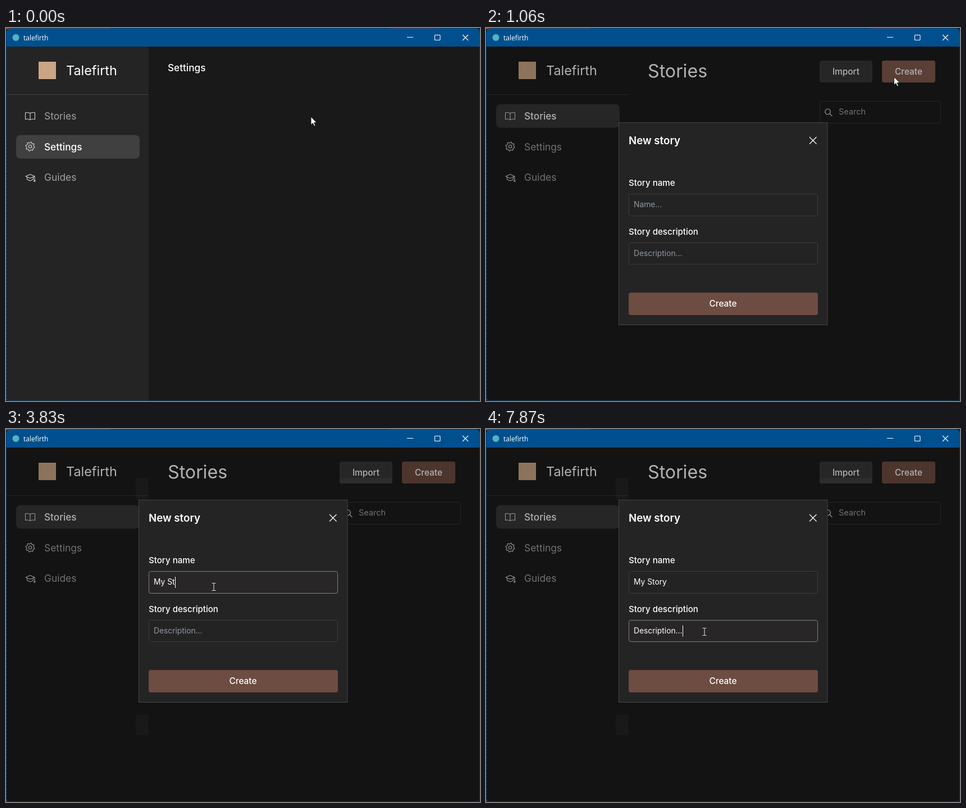
An HTML page that plays this animation: 844x664 px, repeating every 8000 ms.

```html
<!DOCTYPE html>
<html lang="en">
<head>
<meta charset="utf-8">
<title>talefirth</title>
<style>
html, body { margin: 0; width: 100%; height: 100%; overflow: hidden; background: #14202c; }
svg { display: block; width: 844px; height: 664px; }
text { font-family: Inter, "Noto Sans", sans-serif; fill: #fff; white-space: pre; }
.caption { font: 12px "Open Sans", "Noto Sans", sans-serif; }
.brand { font-size: 23.4px; }
.h1 { font-size: 32.2px; }
.h2 { font-size: 17.2px; font-weight: 500; }
.nav { font-size: 17.4px; fill: #a2a2a2; }
.nav.on { font-size: 17.2px; font-weight: 500; fill: #fff; }
.btn { font-size: 15.4px; font-weight: 500; text-anchor: middle; }
.hint { font-size: 14.5px; fill: #a3a3a3; }
.title { font-size: 18.7px; font-weight: 600; }
.label { font-size: 15.1px; font-weight: 500; }
.value { font-size: 13.8px; }
.value.empty { fill: #9098a3; }
.line { fill: none; stroke: #d4d4d4; stroke-width: 1.1; stroke-linejoin: round; stroke-linecap: round; }
.page { fill: #191919; }
.side { fill: #242424; }
.grey { fill: #404040; }
.rule { fill: none; stroke: #434343; }
.open .page, .open .side { fill: #1b1b1b; }
.open .grey { fill: #373737; }
.open .rule { stroke: #363636; }
.field { fill: #232323; stroke: #3d3d3d; }
.field.on { fill: #282626; stroke: #808080; }
.pointer { fill: #fff; stroke: #000; stroke-width: .8; stroke-linejoin: round; }
</style>
</head>
<body>
<svg id="stage" viewBox="0 0 844 664">
  <defs>
    <clipPath id="frame"><rect x="1" y="1" width="843" height="663" rx="7"/></clipPath>
  </defs>

  <!-- desktop showing behind the window -->
  <rect width="186" height="2" fill="#9a4310"/>
  <rect x="683" width="87" height="2" fill="#b5101c"/>
  <path d="M.5 198V664" stroke="#4f6b82" stroke-dasharray="3 4"/>

  <g clip-path="url(#frame)">
    <rect width="844" height="33" fill="#00508f"/>
    <circle cx="17.5" cy="17" r="6" fill="#53b3c2"/>
    <text class="caption" x="31" y="21.5">talefirth</text>
    <g fill="none" stroke="#fff" stroke-width="1.1">
      <path d="M714 16.5H725M813 12L823 22M823 12L813 22"/>
      <rect x="763.5" y="12.5" width="9.5" height="9" rx="1"/>
    </g>

    <rect class="page" y="33" width="844" height="631"/>
    <rect class="side" x="1" y="33" width="253" height="631"/>
    <path class="rule" d="M1 118.5H254"/>
    <rect x="58" y="60" width="31" height="31" fill="#c9a584"/>
    <text class="brand" x="107" y="84">Talefirth</text>

    <rect id="active" class="grey" x="18" width="220" height="42" rx="8"/>
    <g class="line">
      <path d="M43 152Q39 149 34.5 151V162.5Q39 161 43 163.5Q47 161 51.5 162.5V151Q47 149 43 152V163"/>
      <path id="gear"/>
      <circle cx="43" cy="211" r="2.7"/>
      <path d="M43 260.5L35 264 43 267.5 51 264ZM37.500 265.500V269.500L43 272 48.500 269.500V265.500M51 264V270M49.500 273L51 270 52 273Z"/>
    </g>
    <text class="nav" x="68" y="162.5">Stories</text>
    <text class="nav" x="68" y="217.5">Settings</text>
    <text class="nav" x="68" y="272">Guides</text>

    <text id="settings" class="h2" x="288" y="77">Settings</text>
    <g id="stories">
      <text class="h1" x="288" y="88">Stories</text>
      <rect class="grey" x="594" y="58" width="94" height="39" rx="4"/>
      <text class="btn" x="641" y="82.5">Import</text>
      <rect id="create" x="705" y="58" width="95" height="39" rx="4"/>
      <text class="btn" x="752.5" y="82.5">Create</text>
      <rect class="rule" x="594.5" y="130.5" width="215" height="39" rx="4"/>
      <g class="line" style="stroke-width:1.3"><circle cx="608.5" cy="149" r="4.8"/><path d="M612 152.5L616 156.5"/></g>
      <text class="hint" x="628" y="154">Search</text>
    </g>
    <g id="dim">
      <rect y="33" width="844" height="631" opacity=".3"/>
      <g id="edge">
        <path d="M231 87H254V126H231ZM231 509H254V545H231Z" fill="#191919"/>
        <path d="M231 118.5H254" stroke="#2a2a2a"/>
        <path d="M594 87H688V93Q688 97 684 97H598Q594 97 594 93Z" fill="#2c2c2c"/>
      </g>
    </g>

    <g id="modal">
      <rect x="236.5" y=".5" width="371.5" height="360" fill="#242424" stroke="#454545"/>
      <text class="title" x="254" y="38.5">New story</text>
      <path d="M576 26L588.5 38.5M588.5 26L576 38.5" stroke="#fff" stroke-width="1.3"/>
      <rect id="mark" y="184" height="21" fill="#0a3ba8"/>
      <text class="label" x="254" y="113">Story name</text>
      <text class="label" id="about" x="254" y="200">Story description</text>
      <g id="name">
        <rect class="field" x="254.5" y="127.5" width="336" height="39" rx="3"/>
        <text class="value" x="263" y="151"></text>
        <rect y="137" width="1" height="20" fill="#fff"/>
      </g>
      <g id="desc">
        <rect class="field" x="254.5" y="214.5" width="336" height="38" rx="3"/>
        <text class="value" x="263" y="237.5"></text>
        <rect y="223.5" width="1" height="20" fill="#fff"/>
      </g>
      <rect x="254" y="303" width="337" height="40" rx="4" fill="#6d4c41"/>
      <text class="btn" x="422" y="328">Create</text>
    </g>
  </g>
  <rect x=".5" y=".5" width="843" height="663" rx="7.5" fill="none" stroke="#00508f" stroke-opacity=".6"/>

  <g id="cursor">
    <path class="pointer" d="M0 0V14.5L3.4 11.4 5.7 16.7 7.9 15.7 5.6 10.5H10.2Z"/>
    <path class="pointer" d="M-1.5 1.5A1.5 1.5 0 0 1 1.5 1.5V6.2L7.3 7.6Q9 8 8.8 10L8 14.5 6.8 18.5H-.2L-4.8 12.6Q-5.7 10.7-4 10.3L-1.5 12Z"/>
    <path d="M-3.5-6.5H-1L0-6 1-6.5H3.5M0-6V6M-3.5 6.5H-1L0 6 1 6.5H3.5" fill="none" stroke="#d8d8d8" stroke-width="1.1"/>
  </g>
</svg>
<script>
const LOOP = 8000;
const ARROW = 0, HAND = 1, BEAM = 2;
const $ = id => document.getElementById(id);
const show = (el, on) => { el.style.display = on ? '' : 'none'; };

// time, x, y, shape
const moves = [
  [0, 543, 158, ARROW], [140, 395, 151, ARROW], [270, 182, 157, HAND], [390, 130, 158, HAND],
  [510, 292, 148, ARROW], [640, 540, 118, ARROW], [760, 694, 98, ARROW], [910, 727, 88, HAND],
  [1060, 726.5, 87, ARROW], [1210, 712, 102, ARROW], [1340, 685.5, 121.5, ARROW],
  [1460, 550, 182, ARROW], [1590, 412, 234, ARROW], [1740, 335, 266, BEAM], [1860, 292, 275, BEAM],
  [2000, 330, 279, BEAM], [2130, 360, 281, BEAM], [2260, 370, 281, BEAM],
  [4840, 372, 310, BEAM], [4960, 374, 340, BEAM], [5110, 377, 344.5, ARROW],
  [5240, 384, 358, BEAM], [5630, 389, 361, BEAM]
];
// time, top edge of the dialog
const slide = [[1060, 168], [1210, 137], [1340, 128.5], [1460, 127], [1590, 126]];
// time, colour of the upper Create button
const hover = [[0, '#6d4c41'], [910, '#8d6658'], [1060, '#7f5a4d'], [1210, '#6d4c41']];

// typed: time, letters; caret: time, visible
const fields = [
  { el: $('name'), hint: 'Name...', text: 'My Story', from: 2000, to: 5110,
    typed: [[0, 0], [3350, 1], [3470, 2], [3590, 3], [3710, 4], [3830, 5], [3950, 6], [4070, 7], [4200, 8]],
    caret: [[0, 1], [2510, 0], [3040, 1], [4720, 0]] },
  { el: $('desc'), hint: 'Description...', text: 'Description...', from: 5390, to: LOOP,
    typed: [[0, 0], [6310, 1], [6460, 2], [6580, 3], [6700, 4], [6820, 5], [6940, 6],
      [7090, 7], [7210, 8], [7330, 10], [7480, 11], [7750, 12], [7870, 14]],
    caret: [[0, 1], [5920, 0], [6310, 1]] }
];

// last row already reached
const at = (rows, t) => rows.reduce((found, row) => row[0] <= t ? row : found, rows[0]);

function gearPath() {
  const points = [];
  for (let i = 0; i < 32; i++) {
    const a = (i + .5) * Math.PI / 16, r = i % 4 < 2 ? 8 : 6.2;
    points.push((43 + r * Math.cos(a)).toFixed(2) + ' ' + (211 + r * Math.sin(a)).toFixed(2));
  }
  return 'M' + points.join('L') + 'Z';
}

function drawField(f, t) {
  const [box, text, caret] = f.el.children;
  const focus = t >= f.from && t < f.to;
  const typed = f.text.slice(0, at(f.typed, t)[1]);
  box.classList.toggle('on', focus);
  text.classList.toggle('empty', !typed);
  text.textContent = typed || f.hint;
  caret.setAttribute('x', typed ? 263 + Math.round(text.getComputedTextLength()) : 263);
  show(caret, focus && at(f.caret, t)[1]);
}

function draw(t) {
  const stories = t >= 390, open = t >= 1060;
  $('stage').classList.toggle('open', open);
  show($('settings'), !stories);
  show($('stories'), stories);
  show($('dim'), open);
  show($('edge'), t >= 1210);
  show($('modal'), open);
  $('active').setAttribute('y', stories ? 135.5 : 190.5);
  $('create').setAttribute('fill', at(hover, t)[1]);
  document.querySelectorAll('.nav').forEach((el, i) => el.classList.toggle('on', i === (stories ? 0 : 1)));

  if (open) {
    $('modal').setAttribute('transform', `translate(0 ${at(slide, t)[1]})`);
    fields.forEach(f => drawField(f, t));
    const last = $('about').getExtentOfChar(16);
    $('mark').setAttribute('x', last.x);
    $('mark').setAttribute('width', last.width);
    show($('mark'), t >= 5110 && t < 5390);
  }

  const [, x, y, shape] = at(moves, t);
  $('cursor').setAttribute('transform', `translate(${x} ${y})`);
  [...$('cursor').children].forEach((el, i) => show(el, i === shape));
}

function tick() {
  draw(performance.now() % LOOP);
  requestAnimationFrame(tick);
}

$('gear').setAttribute('d', gearPath());
tick();
</script>
</body>
</html>
```
